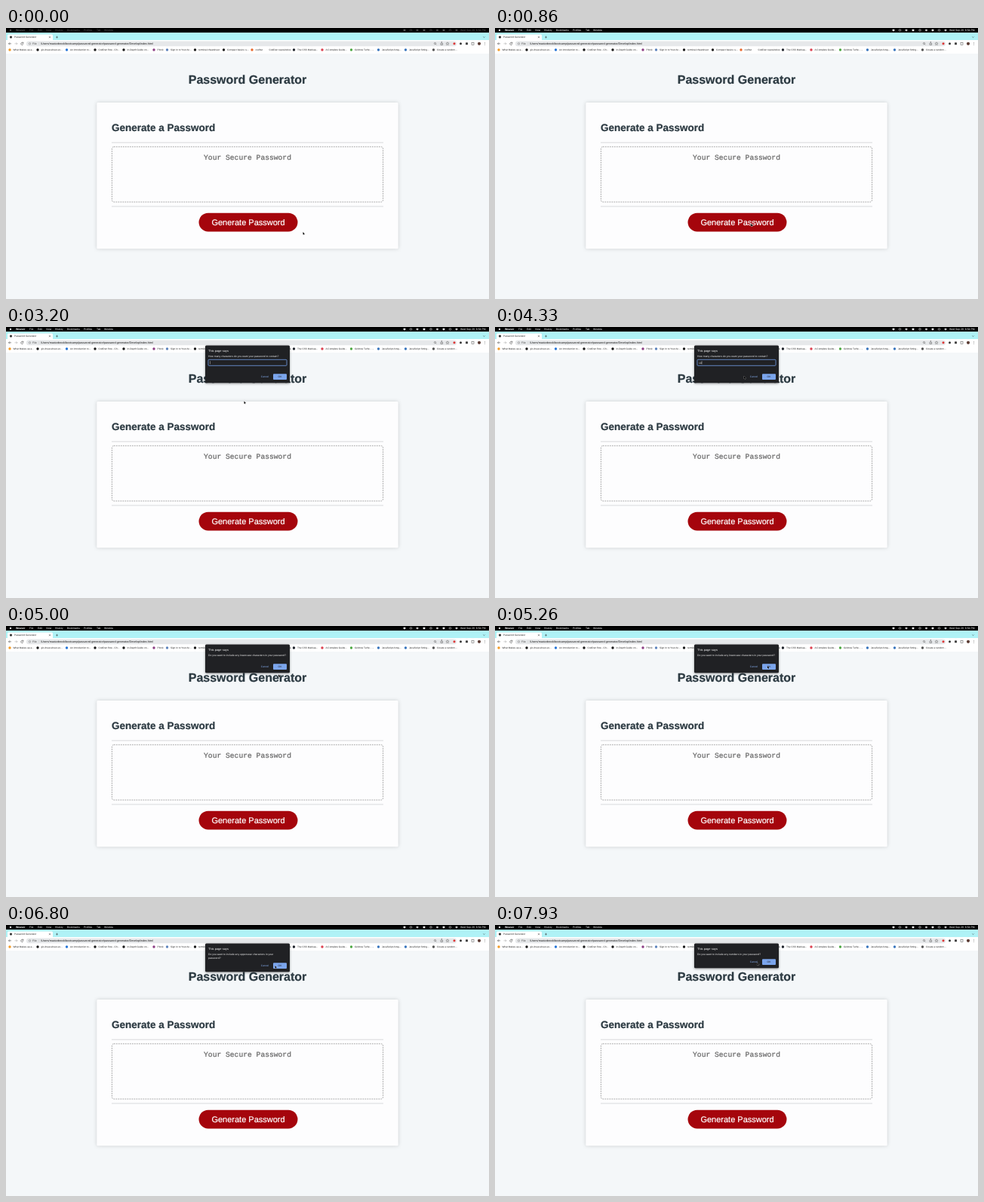
These frames come from a looping animation (640x360 px, 8000 ms). An HTML page:

```html
<!DOCTYPE html>
<html lang="en">
<head>
<meta charset="utf-8">
<title>Password Generator</title>
<style>
  html, body { margin: 0; width: 100%; height: 100%; overflow: hidden; background: #f4f7f9; }
  svg { display: block; width: 640px; height: 360px; }
  text { font-family: "Liberation Sans", Arial, sans-serif; text-rendering: geometricPrecision; white-space: pre; }
  .card { filter: drop-shadow(0 .8px 2.5px rgba(0, 0, 0, .17)); }
  .dialog { filter: drop-shadow(0 1px 1.5px rgba(0, 0, 0, .4)); }
  .mono { font-family: "Liberation Mono", "Courier New", monospace; }
  .heavy { stroke: currentColor; stroke-width: .22px; }
</style>
</head>
<body>
<svg id="stage" viewBox="0 0 640 360" xmlns="http://www.w3.org/2000/svg"></svg>
<script>
const LOOP = 8000;
const stage = document.getElementById('stage');

function add(tag, attrs, parent = stage) {
  const el = document.createElementNS('http://www.w3.org/2000/svg', tag);
  for (const key in attrs) el.setAttribute(key, attrs[key]);
  parent.append(el);
  return el;
}
const rect = (x, y, width, height, fill, more, parent) =>
  add('rect', { x, y, width, height, fill, ...more }, parent);
const dot = (cx, cy, r, fill, more, parent) => add('circle', { cx, cy, r, fill, ...more }, parent);
const path = (d, stroke, more, parent) =>
  add('path', { d, stroke, fill: 'none', 'stroke-width': .6, ...more }, parent);
function label(content, x, y, size, fill, more, parent) {
  const el = add('text', { x, y, 'font-size': size, fill, color: fill, ...more }, parent);
  el.textContent = content;
  return el;
}
const bold = { 'font-weight': 700 };
const middle = { 'text-anchor': 'middle' };

// Menu bar
rect(0, 0, 640, 6.3, '#000');
const menu = add('g');
dot(6, 3, 1.2, '#ddd', {}, menu);
label('Weaver', 13, 4.2, 3.5, '#fff', bold, menu);
[['File', 31], ['Edit', 42], ['View', 53], ['History', 65], ['Bookmarks', 81],
 ['Profiles', 103], ['Tab', 120], ['Window', 130]]
  .forEach(([word, x]) => label(word, x, 4.2, 3.4, '#fff', {}, menu));
[528, 536.5, 545, 554, 563, 571.5, 580, 588.5, 597].forEach((x, i) => {
  if (i % 3 == 1) dot(x, 3, 1.3, 'none', { stroke: '#ddd', 'stroke-width': .6 }, menu);
  else rect(x - 1.3, 1.8, 2.6, 2.4, i % 3 ? '#bbb' : '#eee', { rx: .5 }, menu);
});
label('Wed Sep 28  8:54 PM', 602, 4.2, 3.45, '#fff', {}, menu);

// Tab strip
rect(0, 6.3, 640, 10, '#aff2f6');
rect(2, 8.5, 60, 9, '#fff', { rx: 1.5 });
dot(6.5, 12.1, 1.6, '#333');
label('Password Generator', 11, 13.2, 3.2, '#222');
path('M57 11.2l2 2m0-2l-2 2M66 12.2h3m-1.5-1.5v3', '#333', { 'stroke-width': .5 });
path('M632.3 11.5l1.2 1.2 1.2-1.2', '#333', { 'stroke-width': .5 });

// Toolbar
rect(0, 16, 640, 18, '#fff');
path('M7 20.8H3.5m1.5-1.5l-1.5 1.5 1.5 1.5', '#444');
path('M11.5 20.8H15m-1.5-1.5l1.5 1.5-1.5 1.5', '#aaa');
path('M22.7 20a1.6 1.6 0 1 0 .2 1.4M22.9 18.7v1.5h-1.5', '#444');
rect(27, 17.6, 570, 6.6, '#e6e8ea', { rx: 3.3 });
dot(31.5, 20.8, 1.2, 'none', { stroke: '#555', 'stroke-width': .4 });
label('File', 35, 22, 3.5, '#444');
path('M43.8 19.2v3.3', '#aaa', { 'stroke-width': .3 });
label('/Users/maxtarbrook/bootcamp/password-generator/password-generator/Develop/index.html',
  46, 22, 3.68, '#111');
dot(568.5, 20.5, 1.1, 'none', { stroke: '#444', 'stroke-width': .5 });
path('M569.3 21.3l1 1M576 20v2.4h2.6V20m-1.3 1V18.4m-.8.7l.8-.7.8.7', '#444', { 'stroke-width': .5 });
path('M585 18.8l.6 1.3 1.4.1-1 1 .3 1.4-1.3-.7-1.3.7.3-1.4-1-1 1.4-.1z', '#444', { 'stroke-width': .4 });
dot(594, 20.8, 1.5, '#d33');
dot(602.5, 20.8, 1.5, '#333');
rect(609, 19.3, 3, 3, '#444', { rx: .6 });
rect(617, 19.3, 3, 3, 'none', { stroke: '#444', 'stroke-width': .5 });
dot(627, 20.8, 2.1, '#5c3d35');
[19.4, 20.8, 22.2].forEach(y => dot(634.5, y, .4, '#333'));

// Bookmarks
[[5, '#f39a23', 'What Makes up a...'], [42, '#181818', 'git-cheat-sheet-ex...'],
 [80.5, '#2675d8', 'An introduction to...'], [118, '#181818', 'CodDen flow - Ch...'],
 [156, '#181818', 'In-Depth Guide on...'], [196, '#8c3d83', 'Plonk'],
 [213.5, '#5c83bd', 'Sign In to Your Ac...'], [250.5, '#181818', 'terminal cheatsheet'],
 [288.5, '#181818', 'Compact basics: u...'], [326, '#e9682c', 'codhut'],
 [344, '#fff', 'CodDen repositories'], [381.5, '#20242c', 'The CSS Markup...'],
 [419, '#dc4050', 'A Complete Guide...'], [457.5, '#4da943', 'Gridrow Turtle - ...'],
 [493.5, '#3975bd', 'JavaScript Array...'], [529.5, '#3975bd', 'JavaScript String...'],
 [566.5, '#555', 'Create a random...']].forEach(([x, color, name]) => {
  dot(x, 29, 1.7, color);
  label(name, x + 4.5, 30.2, 3.2, '#222');
});

// Page
label('Password Generator', 320, 74.3, 16, '#2c3a42', { ...bold, ...middle, class: 'heavy' });
rect(120.3, 99, 399.4, 194.3, '#fdfdfe', { rx: 1.5, class: 'card' });
label('Generate a Password', 140, 137.4, 13.5, '#2c3a42', { ...bold, class: 'heavy' });
path('M140 152.2H500M140 237H500', '#cfd1d3', { 'stroke-width': .8 });
rect(140.4, 157.8, 359.2, 73.3, '#fdfdfe',
  { rx: 2.5, stroke: '#8f8f8f', 'stroke-width': .8, 'stroke-dasharray': '1.8 1.2' });
label('Your Secure Password', 320, 175, 9.66, '#666', { ...middle, class: 'mono heavy' });
rect(255.5, 245.7, 131, 24.8, '#a5050c', { rx: 12.4 });
label('Generate Password', 321, 261.8, 11, '#fff', { ...middle, class: 'heavy' });

// Dialogs
function makeDialog(bottom, lines, hasInput) {
  const g = add('g');
  rect(264, 24.5, 112, bottom - 24.5, '#202124', { rx: 1.5, class: 'dialog' }, g);
  label('This page says', 268, 32.6, 4, '#f4f4f4', {}, g);
  lines.forEach((line, i) => label(line, 268, 40 + i * 5, 3.43, '#f0f0f0', {}, g));
  if (hasInput)
    rect(268, 43.3, 104, 8, '#202124', { rx: 1, stroke: '#719fe8', 'stroke-width': .8 }, g);
  label('Cancel', 343, bottom - 6.9, 3.3, '#8ab4f8', middle, g);
  rect(354, bottom - 12, 18, 7.8, '#7ba5ec', { rx: 1 }, g);
  label('OK', 363, bottom - 6.9, 3.3, '#202124', middle, g);
  return g;
}
const dialogs = [
  [2130, 4900, makeDialog(74.3, ['How many characters do you want your password to contain?'], true)],
  [4900, 5930, makeDialog(62.3, ['Do you want to include any lowercase characters in your password?'])],
  [5930, 7060, makeDialog(62.3, ['Do you want to include any uppercase characters in your', 'password?'])],
  [7060, LOOP, makeDialog(57.3, ['Do you want to include any numbers in your password?'])]
];
const prompt = dialogs[0][2];
const typed = label('', 270, 48.6, 3.43, '#eee', {}, prompt);
const caret = rect(270, 45.2, .4, 4.2, '#eee', {}, prompt);

// Pointer: [time, x, y]
const route = [
  [0, 393.5, 271], [60, 393.5, 271], [860, 339, 259], [1400, 339, 259], [1660, 337, 258.5],
  [2050, 337, 258.5], [2200, 336, 254], [2750, 315.5, 98.5], [4000, 315.5, 98.5],
  [4330, 330, 65.5], [4800, 361, 66], [4930, 361, 66], [5240, 361, 53], [5450, 361, 53],
  [5900, 359, 54], [6260, 359, 54], [6800, 356.5, 54], [7060, 358, 53], [7200, 356, 52],
  [7800, 347.5, 50], [LOOP, 347.5, 50]
];
const pointer = add('g');
const arrow = path('M0 0V3.4L.8 2.7 1.3 3.9 1.9 3.6 1.4 2.5H2.4Z', '#fff',
  { fill: '#000', 'stroke-width': .35, 'paint-order': 'stroke' }, pointer);
const hand = path('M0 0q.7-.3.8.4v1.3l1.5.4q.6.3.4 1L2.3 4.5H.3L-.9 2.7q0-.6.7-.2z', '#fff',
  { fill: '#111', 'stroke-width': .4 }, pointer);

function pointerAt(t) {
  const i = route.findIndex(stop => stop[0] > t);
  const [t0, x0, y0] = route[i - 1], [t1, x1, y1] = route[i];
  const p = (t - t0) / (t1 - t0), ease = p * p * (3 - 2 * p);
  return [x0 + (x1 - x0) * ease, y0 + (y1 - y0) * ease];
}
const show = (el, on) => el.setAttribute('visibility', on ? 'visible' : 'hidden');

function draw(t) {
  menu.setAttribute('opacity', t < 60 ? .35 : 1);
  dialogs.forEach(([from, to, el]) => el.style.display = t >= from && t < to ? '' : 'none');
  const count = (t >= 3400) + (t >= 3660);
  typed.textContent = '10'.slice(0, count);
  caret.setAttribute('x', 270 + count * 1.91);
  caret.style.display = (t - 2130) % 1000 < 500 ? '' : 'none';

  const [x, y] = pointerAt(t);
  const overButton = t < 2130 && x < 385 && y > 246 && y < 270;
  pointer.setAttribute('transform', `translate(${x} ${y})`);
  show(arrow, !overButton);
  show(hand, overButton);
}
const start = performance.now();
function tick() {
  draw((performance.now() - start) % LOOP);
  requestAnimationFrame(tick);
}
tick();
</script>
</body>
</html>
```
